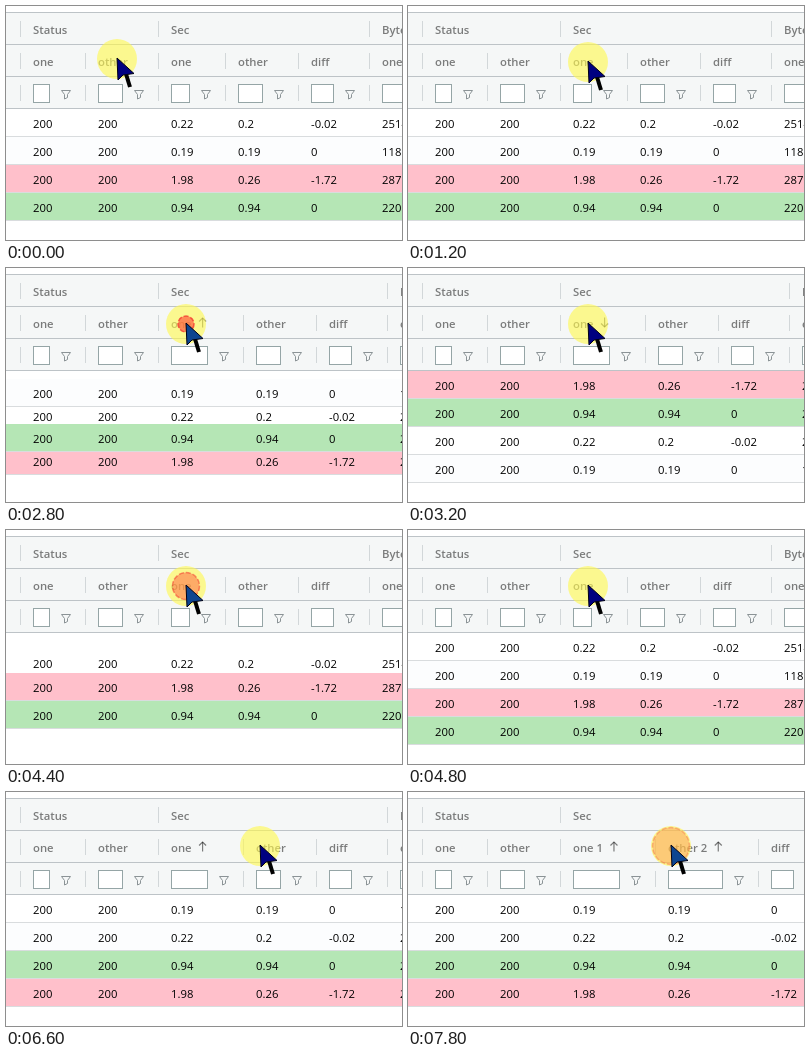
An HTML page with a canvas for the animation above (8 s loop, 396 by 234 pixels).

```html
<!DOCTYPE html>
<html lang="en">
<head>
<meta charset="utf-8">
<title>Grid sorting</title>
<style>
html, body { margin: 0; width: 100%; height: 100%; overflow: hidden; background: #fff; }
canvas { display: block; }
</style>
</head>
<body>
<canvas id="stage" width="396" height="234"></canvas>
<script>
const ctx = document.getElementById('stage').getContext('2d');
const LOOP = 8000, STEP = 200, WIDTH = 396;
const GRID_TOP = 103, ROW = 28;
const GREY = 'rgba(0,0,0,.5)', LINE = '#bdc3c7';

const rows = [
  { cells: ['200', '200', '0.22', '0.2', '-0.02', '2514'] },
  { cells: ['200', '200', '0.19', '0.19', '0', '1182'] },
  { cells: ['200', '200', '1.98', '0.26', '-1.72', '2870'], color: '#ffc0cb' },
  { cells: ['200', '200', '0.94', '0.94', '0', '2206'], color: '#b5e6b5' },
];

// Slot of every row under each ordering
const unsorted = [0, 1, 2, 3], ascending = [1, 0, 3, 2], descending = [2, 3, 0, 1];
const sorts = [
  { at: -1000, slots: unsorted },
  { at: 1490, slots: ascending },
  { at: 2760, slots: descending },
  { at: 4230, slots: unsorted },
  { at: 5880, slots: ascending },
];

// Width of the two sortable columns, their label suffix and arrow
const plain = { widths: [67, 73], suffix: ['', ''], arrows: [0, 0] };
const up = { widths: [85, 73], suffix: ['', ''], arrows: [1, 0] };
const headers = [
  { at: 0, ...plain },
  { at: 1800, ...up },
  { at: 3000, ...up, arrows: [-1, 0] },
  { at: 4400, ...plain },
  { at: 6200, ...up },
  { at: 7600, widths: [95, 103], suffix: [' 1', ' 2'], arrows: [1, 1] },
];

const clicks = [1370, 2640, 4130, 5760, 7430];
const pointer = [
  [0, 111, 53], [200, 148, 48], [400, 166, 46], [600, 174, 46], [800, 180, 52],
  [1000, 180, 55], [1200, 180, 56], [6200, 180, 56], [6400, 211, 58],
  [6600, 254, 54], [6800, 263, 54],
];

const lastBefore = (list, t) => list.filter(item => item.at <= t).pop();

// CSS "ease" timing curve
function ease(x) {
  if (x >= 1) return 1;
  let lo = 0, hi = 1, u;
  const bezier = (a, b) => 3 * a * u * (1 - u) ** 2 + 3 * b * u * u * (1 - u) + u ** 3;
  for (let i = 0; i < 20; i++) {
    u = (lo + hi) / 2;
    if (bezier(.25, .25) < x) lo = u; else hi = u;
  }
  return bezier(.1, 1);
}

function rect(x, y, w, h, color) {
  ctx.fillStyle = color;
  ctx.fillRect(x, y, w, h);
}

function text(str, x, y, color, weight = 400) {
  ctx.font = `${weight} 11.3px "Open Sans", "Noto Sans", sans-serif`;
  ctx.fillStyle = color;
  ctx.fillText(str, x, y);
}

function path(points, close) {
  ctx.beginPath();
  points.forEach(([x, y]) => ctx.lineTo(x, y));
  if (close) ctx.closePath();
}

function disc(x, y, r, color) {
  ctx.beginPath();
  ctx.arc(x, y, r, 0, 7);
  ctx.fillStyle = color;
  ctx.fill();
}

function strokeIn(color, width = 1) {
  ctx.strokeStyle = color;
  ctx.lineWidth = width;
  ctx.stroke();
}

function drawRows(t, lefts) {
  const i = sorts.indexOf(lastBefore(sorts, t));
  const to = sorts[i].slots, from = sorts[Math.max(0, i - 1)].slots;
  const p = ease((t - sorts[i].at) / 400);
  rows.forEach((row, r) => {
    const y = Math.round(GRID_TOP + ROW * (from[r] + (to[r] - from[r]) * p));
    rect(0, y, WIDTH, ROW, row.color || (to[r] % 2 ? '#fcfdfe' : '#fff'));
    rect(0, y + ROW - 1, WIDTH, 1, '#d9dcde');
    row.cells.forEach((cell, c) => text(cell, lefts[c] + 13, y + 19, '#000'));
  });
}

function drawArrow(x, dir) {
  ctx.save();
  ctx.translate(x, 54.5);
  ctx.scale(1, dir);
  path([[0, 5], [0, -4.5]]);
  strokeIn(GREY, 1.2);
  path([[-3.5, -1], [0, -4.5], [3.5, -1]]);
  strokeIn(GREY, 1.2);
  ctx.restore();
}

function drawFilter(left, width) {
  const x = left + 13, f = left + width - 19;
  rect(x, 78, width - 48, 19, '#95a5a6');
  rect(x + 1, 79, width - 50, 17, '#fff');
  path([[f - 4.5, 84.5], [f + 4.5, 84.5], [f + 1.5, 88.5], [f + 1.5, 91.5],
    [f - 1.5, 93], [f - 1.5, 88.5]], true);
  strokeIn('#8b9396');
}

function drawHeader(header, lefts, widths) {
  rect(0, 6, WIDTH, 97, '#f5f7f7');
  for (const y of [6, 38, 70, 102]) rect(0, y, WIDTH, 1, LINE);
  [['Status', 0], ['Sec', 2], ['Bytes', 5]].forEach(([label, c]) => {
    rect(lefts[c], 15, 1, 16, '#d2d7d9');
    text(label, lefts[c] + 13, 28, GREY, 600);
  });
  ['one', 'other', 'one', 'other', 'diff', 'one'].forEach((name, c) => {
    const left = lefts[c], label = name + (header.suffix[c - 2] || '');
    for (const y of [47, 79]) rect(left, y, 1, 16, '#d2d7d9');
    text(label, left + 13, 60, GREY, 600);
    const arrow = header.arrows[c - 2];
    if (arrow) drawArrow(left + 24 + ctx.measureText(label).width, arrow);
    drawFilter(left, widths[c]);
  });
}

function drawPointer(t) {
  const [, x, y] = pointer.filter(key => key[0] <= t).pop();
  disc(x, y, 20, 'rgba(255,248,80,.62)');

  const age = clicks.map(start => t - start).find(a => a > 50 && a < 500);
  if (age) {
    const r = age * .05;
    ctx.globalAlpha = 1 - r / 26;
    disc(x, y, r, 'rgb(255,90,60)');
    ctx.setLineDash([5, 2]);
    strokeIn('#f02828', 1.5);
    ctx.setLineDash([]);
    ctx.globalAlpha = 1;
  }

  ctx.save();
  ctx.translate(x, y);
  path([[9, 15], [13, 28]]);
  strokeIn('#000', 4);
  path([[0, -1], [1, 21], [6, 16], [17, 14.5]], true);
  ctx.fillStyle = age ? '#0d4590' : '#000080';
  ctx.fill();
  strokeIn('#000014');
  ctx.restore();
}

function draw(now) {
  const t = Math.floor(now % LOOP / STEP) * STEP;
  const header = lastBefore(headers, t);
  const widths = [65, 73, ...header.widths, 71, 80];
  let edge = 14;
  const lefts = widths.map(w => (edge += w) - w);

  rect(0, 0, WIDTH, 234, '#fff');
  drawRows(t, lefts);
  drawHeader(header, lefts, widths);
  drawPointer(t);
  requestAnimationFrame(draw);
}
requestAnimationFrame(draw);
</script>
</body>
</html>
```
